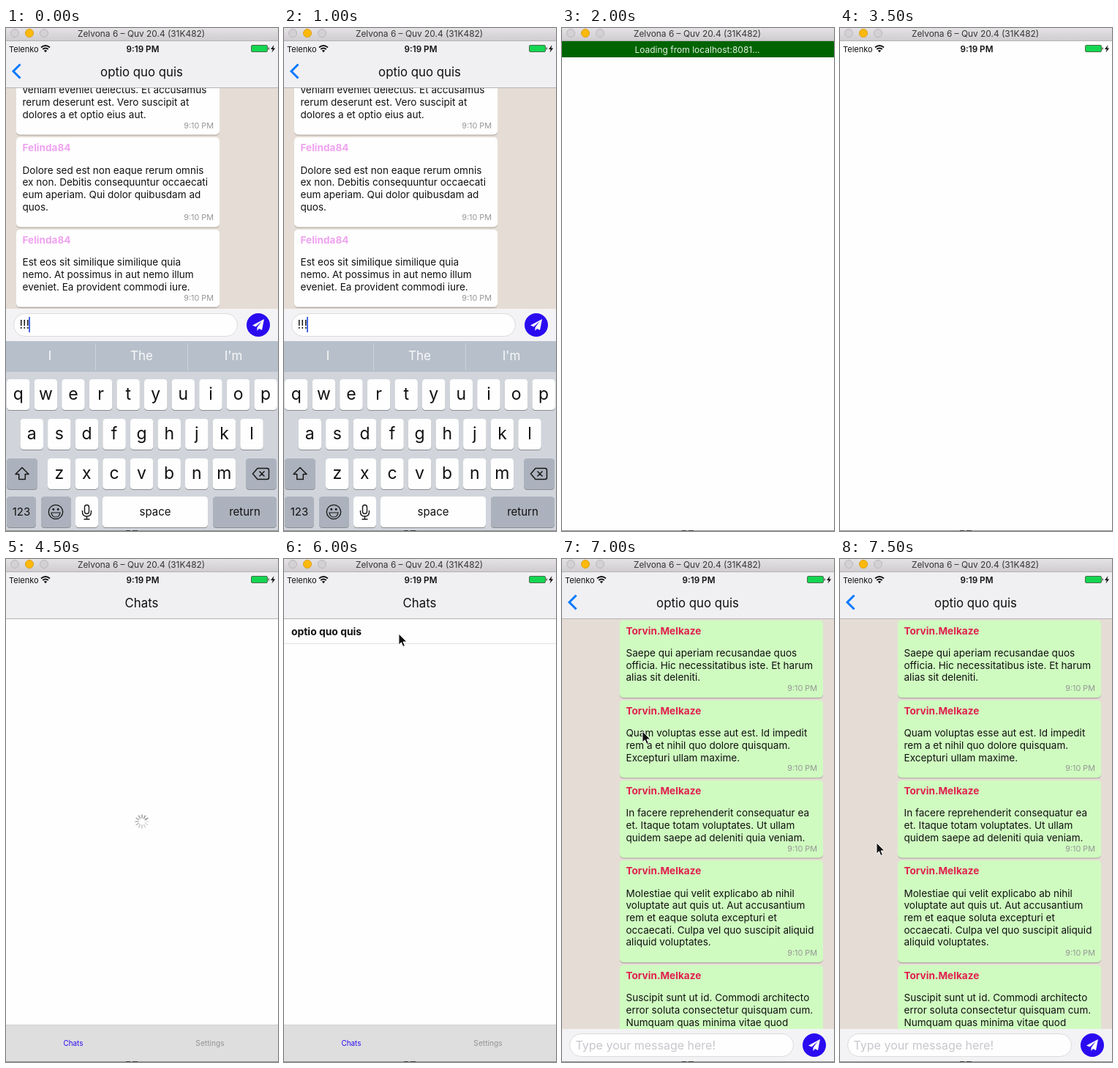
These frames come from a looping animation (372 px wide and 686 px high, 8 s). An HTML page:

```html
<!DOCTYPE html>
<html lang="en">
<head>
<meta charset="utf-8">
<title>Chat reload</title>
<style>
html, body { margin: 0; width: 100%; height: 100%; overflow: hidden; background: #fefefe; }
svg { display: block; width: 372px; height: 686px; }
text { font-family: Inter, "Open Sans", sans-serif; white-space: pre; }
</style>
</head>
<body>
<svg id="stage" viewBox="0 0 372 686" xmlns="http://www.w3.org/2000/svg"></svg>
<script>
const BLUE = '#2a0bf0', WHITE = '#fefefe';

const rect = (x, y, w, h, fill, extra = '') =>
  `<rect x="${x}" y="${y}" width="${w}" height="${h}" fill="${fill}" ${extra}/>`;
const text = (str, x, y, size, fill = '#111', anchor = 'start', weight = 400) =>
  `<text x="${x}" y="${y}" font-size="${size}" fill="${fill}" text-anchor="${anchor}" font-weight="${weight}">${str}</text>`;
const line = (d, color, width = 1.5, extra = '') =>
  `<path d="${d}" fill="none" stroke="${color}" stroke-width="${width}" ${extra}/>`;
const shape = (d, fill, extra = '') => `<path d="${d}" fill="${fill}" ${extra}/>`;
const circle = (x, y, r, fill, extra = '') => `<circle cx="${x}" cy="${y}" r="${r}" fill="${fill}" ${extra}/>`;

function bubble(x, top, fill, nameColor, name, lines) {
  const h = 55.5 + 16.7 * lines.length;
  return rect(x, top + 1.3, 278, h, '#00000038', 'rx="5"') +
    rect(x, top, 278, h, fill, 'rx="5"') +
    text(name, x + 8.5, top + 19.3, 13.6, nameColor, 'start', 700) +
    lines.map((s, i) => text(s, x + 8.5, top + 49.4 + 16.7 * i, 13.55)).join('') +
    text('9:10 PM', x + 270, top + h - 9, 10.8, '#969696', 'end');
}

function thread(x, top, fill, nameColor, name, messages) {
  return messages.map(lines => {
    const out = bubble(x, top, fill, nameColor, name, lines);
    top += 59.1 + 16.7 * lines.length;
    return out;
  }).join('');
}

function spinner(x, y) {
  let out = '';
  for (let i = 0; i < 12; i++)
    out += line('M0-5V-9', '#8f8c8a', 1.6,
      `stroke-linecap="round" opacity="${0.25 + 0.7 * ((i + 9) % 12) / 11}" transform="translate(${x} ${y}) rotate(${i * 30})"`);
  return out;
}

function inputBar(top, content) {
  const y = top + 22;
  return rect(0, top, 372, 45, '#f3f3f5') +
    rect(10.5, y - 15.5, 306, 31, WHITE, 'rx="15.5" stroke="#dcdcde"') +
    content +
    circle(345, y, 16, BLUE) +
    shape(`M353 ${y - 8}l-16 8.5 4.5 2 8-7.5-6 8.5v4.5l2.5-3 4 2z`, '#fff');
}

function key(x, y, w, label, size, dark) {
  return rect(x, y + 1, w, 42, '#898b8f', 'rx="4.5"') +
    rect(x, y, w, 42, dark ? '#acb2bd' : WHITE, 'rx="4.5"') +
    (label ? text(label, x + w / 2, y + (size > 20 ? 28 : 26), size, '#111', 'middle') : '');
}

function keyboard() {
  const row = (letters, x, y) =>
    [...letters].map((c, i) => key(x + i * 37.6, y, 31.5, c, 23)).join('');
  const ink = '#161616';
  return rect(0, 427, 372, 259, '#d1d5db') + rect(0, 427, 372, 42, '#b7c0ca') +
    [122.5, 248.5].map(x => line(`M${x} 430V467`, '#cdd3da', 1)).join('') +
    text('I', 60, 452.5, 17, '#f8f9fa', 'middle') +
    text('The', 185.5, 452.5, 17, '#f8f9fa', 'middle') +
    text("I'm", 311, 452.5, 17, '#f8f9fa', 'middle') +
    row('qwertyuiop', 1, 479) + row('asdfghjkl', 19.5, 533) + row('zxcvbnm', 57, 587) +
    key(1, 587, 42, '', 0, true) + key(328, 587, 42, '', 0, true) +
    key(1, 639, 40, '123', 15, true) + key(48, 639, 41, '', 0, true) +
    key(95, 639, 31, '') + key(132, 639, 144, 'space', 15) + key(283, 639, 87, 'return', 15, true) +
    line('M22 599.5l9 9h-4.7v7h-8.6v-7H13z', ink, 1.5, 'stroke-linejoin="round"') +
    line('M337.5 608l6.5-7.5h13q2.5 0 2.5 2.5v10q0 2.5-2.5 2.5h-13zM346.5 604.5l7 7m0-7l-7 7', ink, 1.5, 'stroke-linejoin="round"') +
    circle(68, 660, 9.7, 'none', `stroke="${ink}" stroke-width="1.3"`) +
    circle(64.8, 656.5, 1.4, ink) + circle(71.2, 656.5, 1.4, ink) +
    line('M62 661h12q-1 6-6 6t-6-6z', ink, 1.2) +
    rect(107.5, 650.5, 6, 12, 'none', `rx="3" stroke="${ink}" stroke-width="1.4"`) +
    line('M104.5 658v2q0 6 6 6t6-6v-2M110.5 666v4M106.5 670h8', ink, 1.4);
}

const header = (title, x) =>
  rect(0, 18, 372, 63, '#f0f0f3') + rect(0, 81, 372, 1, '#b5b5b7') +
  text(title, x, 65.5, 16.8, '#111', 'middle');
const back = line('M19.5 49.5L10 59l9.5 9.5', '#0a7aff', 3);

const windowBar =
  '<linearGradient id="bar" x2="0" y2="1"><stop stop-color="#e4e2e4"/><stop offset="1" stop-color="#cfcdcf"/></linearGradient>' +
  rect(0, 0, 372, 17, 'url(#bar)') + rect(0, 17, 372, 1, '#b4b2b4') +
  circle(12, 7, 5.5, '#d3d1d3', 'stroke="#bab8ba"') +
  circle(32, 7, 5.5, '#fcb90c', 'stroke="#dda010"') +
  circle(52, 7, 5.5, '#d3d1d3', 'stroke="#bab8ba"') +
  text('Zelvona 6 – Quv 20.4 (31K482)', 185, 12, 11.9, '#353535', 'middle') +
  rect(0, 685, 372, 1, '#8f8f8f') + rect(164, 685, 6, 1, '#333') + rect(173, 685, 7, 1, '#333');

const status =
  text('Telenko', 4, 32.5, 11) +
  line('M48 26.5q6-5 12 0M50.2 29q3.8-3 7.6 0', '#111', 1.8) + shape('M54 33.2l-2.2-2.4q2.2-1.6 4.4 0z', '#111') +
  text('9:19 PM', 187, 32.5, 11.7, '#111', 'middle', 600) +
  rect(335.5, 23.5, 22, 9, '#14d651', 'rx="1.5" stroke="#4b6b4c"') + rect(358.5, 26.5, 1.5, 3, '#4b6b4c') +
  shape('M366.5 23l-4.5 6h2.8l-1.3 4.5 4.7-6h-2.8z', '#111');

const list = rect(0, 82, 372, 604, WHITE);
const row = text('optio quo quis', 10, 104, 13.9, '#111', 'start', 700) + rect(0, 115, 372, 1, '#e2e2e4');
const tabs = rect(0, 635, 372, 50, '#dededf') + rect(0, 635, 372, 1, '#cfcfd0') +
  text('Chats', 92, 664, 9.9, BLUE, 'middle') + text('Settings', 279, 664, 10.2, '#929292', 'middle');

const wall = x => rect(x, 82, 372, 603, '#e5ddd5');

const layers = {
  list, row, tabs,
  oldList: `<g opacity=".45" transform="translate(-.5 17.7) scale(.95)">${rect(0, 81, 372, 1, '#d8d8da')}${row}${tabs}</g>`,
  push: wall(12) + spinner(200, 367),
  wall: wall(0),
  friend: thread(14, 39.9, WHITE, '#efa3ef', 'Felinda84', [
    ['veniam eveniet delectus. Et accusamus', 'rerum deserunt est. Vero suscipit at', 'dolores a et optio eius aut.'],
    ['Dolore sed est non eaque rerum omnis', 'ex non. Debitis consequuntur occaecati', 'eum aperiam. Qui dolor quibusdam ad', 'quos.'],
    ['Est eos sit similique similique quia', 'nemo. At possimus in aut nemo illum', 'eveniet. Ea provident commodi iure.']
  ]),
  own: thread(79, 83.5, '#cffbc0', '#e0204e', 'Torvin.Melkaze', [
    ['Saepe qui aperiam recusandae quos', 'officia. Hic necessitatibus iste. Et harum', 'alias sit deleniti.'],
    ['Quam voluptas esse aut est. Id impedit', 'rem a et nihil quo dolore quisquam.', 'Excepturi ullam maxime.'],
    ['In facere reprehenderit consequatur ea', 'et. Itaque totam voluptates. Ut ullam', 'quidem saepe ad deleniti quia veniam.'],
    ['Molestiae qui velit explicabo ab nihil', 'voluptate aut quis ut. Aut accusantium', 'rem et eaque soluta excepturi et', 'occaecati. Culpa vel quo suscipit aliquid', 'aliquid voluptates.'],
    ['Suscipit sunt ut id. Commodi architecto', 'error soluta consectetur quisquam cum.', 'Numquam quas minima vitae quod']
  ]),
  typed: inputBar(383, text('!!!', 18.5, 410, 15.6)),
  caret: rect(31, 394, 2, 21, '#4566e8'),
  empty: inputBar(641, text('Type your message here!', 18.5, 668.5, 16, '#c7c7cd')),
  keyboard: keyboard(),
  listHead: header('Chats', 185.5),
  chatHead: header('optio quo quis', 185.5) + back,
  pushHead: header('optio quo quis', 193.5) + back,
  status,
  loading: rect(0, 18, 372, 22, '#006400') + text('Loading from localhost:8081...', 185, 33.5, 12, '#e4f0e4', 'middle'),
  spinner: spinner(186, 358),
  windowBar,
  cursor: shape('M0 0V15l3.4-3.2 2.4 5.6 2.6-1.1-2.4-5.4h4.8z', '#111', 'stroke="#fff" stroke-width=".9"')
};

// start time, visible layers, pointer position
const typing = 'wall friend typed keyboard chatHead status';
const scenes = [
  [0, typing + ' caret'],
  [500, typing],
  [1000, typing + ' caret'],
  [1500, 'keyboard status'],
  [2000, 'loading'],
  [3500, 'status'],
  [4500, 'list tabs listHead status spinner'],
  [5000, 'list row tabs listHead status'],
  [5500, 'list row tabs listHead status', [354, 102]],
  [6000, 'list row tabs listHead status', [157, 102]],
  [6500, 'list oldList push pushHead status', [157, 102]],
  [7000, 'wall own empty chatHead status', [110, 235]],
  [7500, 'wall own empty chatHead status', [50, 387]]
];

const stage = document.getElementById('stage');
stage.innerHTML = rect(0, 0, 372, 686, WHITE) +
  Object.entries(layers).map(([id, body]) => `<g id="${id}">${body}</g>`).join('');
const groups = Object.keys(layers).map(id => document.getElementById(id));

let shown;
function draw() {
  const t = performance.now() % 8000;
  const scene = scenes.findLast(s => s[0] <= t);
  if (scene !== shown) {
    shown = scene;
    const [, ids, pointer] = scene;
    const on = new Set(ids.split(' ').concat('windowBar', pointer ? 'cursor' : []));
    for (const g of groups) g.style.display = on.has(g.id) ? '' : 'none';
    if (pointer) document.getElementById('cursor').setAttribute('transform', `translate(${pointer})`);
  }
  requestAnimationFrame(draw);
}
draw();
</script>
</body>
</html>
```
